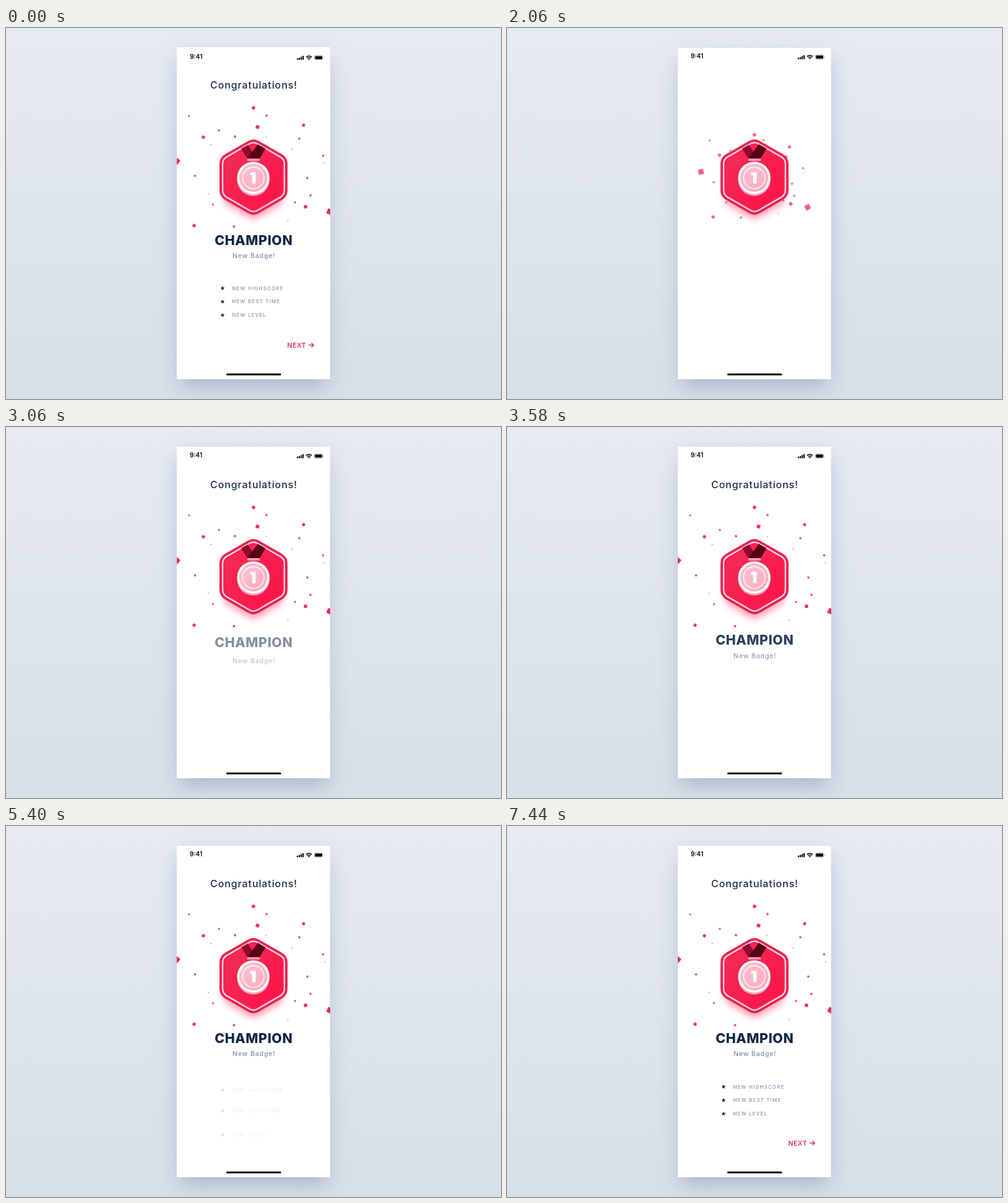
Write an HTML page that moves like this. It is 800x600 px and loops after 8.78 s.

```html
<!DOCTYPE html>
<html lang="en">
<head>
<meta charset="utf-8">
<title>New badge</title>
<style>
html, body { margin: 0; width: 100%; height: 100%; overflow: hidden; }
body { position: relative; background: linear-gradient(#e6ebf3, #dfe5ed 50%, #d7dfe7); }
.shadow {
  position: absolute; left: 276px; top: 32px; width: 247.5px; height: 536px;
  box-shadow: 0 18px 28px -10px rgba(120, 138, 170, .42), 0 8px 36px rgba(165, 180, 205, .32);
}
svg { position: absolute; left: 0; top: 0; width: 800px; height: 600px; display: block; }
text { font-family: Inter, "Open Sans", sans-serif; }
.mid { text-anchor: middle; }
.clock { font-size: 10px; font-weight: 600; }
.head { font-size: 16px; font-weight: 500; letter-spacing: .9px; fill: #182c4c; }
.title { font-size: 21.4px; font-weight: 800; letter-spacing: .6px; fill: #0f2747; }
.sub { font-size: 10.6px; font-weight: 500; letter-spacing: .8px; fill: #8590a4; }
.item text { font-size: 8px; font-weight: 500; letter-spacing: 1.15px; fill: #8a95a8; }
.item use { fill: #14294a; }
.next text { font-size: 10.6px; font-weight: 600; letter-spacing: .5px; fill: #dc335e; }

/* One shared 8.78 s clock */
.first, .scene, .nudge, .head, .rise, .item, .next, .badge { animation: 8780ms linear infinite; }
.first { animation-name: leave; }
.scene { animation-name: fade; }
.nudge { animation-name: nudge; }
.head { animation-name: head; }
.rise { animation-name: rise; }
.item { animation-name: item; }
.next { animation-name: next; }
.badge { animation-name: pop; }
.bit { fill: #ea2c55; animation: fly 8780ms linear infinite, show 8780ms linear infinite; }

@keyframes leave {
  0%, 7.517% { opacity: 1; }
  10.706%, 100% { opacity: 0; }
}
@keyframes fade {
  0%, 7.517% { opacity: 1; }
  10.706% { opacity: 0; }
  10.707%, 100% { opacity: 1; }
}
@keyframes nudge {
  0%, 10.706% { transform: translateY(-.9px); }
  10.707%, 100% { transform: none; }
}
@keyframes pop {
  0%, 10.706% { opacity: 1; transform: none; }
  10.707% { opacity: 0; transform: scale(.3); }
  21.185% { opacity: 0; transform: scale(.3); animation-timing-function: cubic-bezier(.25, 1, .5, 1); }
  23.462% { opacity: 1; transform: translateY(-1px); }
  26%, 100% { opacity: 1; transform: none; }
}
@keyframes fly {
  0%, 10.706% { transform: translate(var(--x), var(--y)) rotate(var(--r)); }
  10.707% { transform: translate(400px, 271px) rotate(calc(var(--r) - 180deg)); }
  21.185% {
    transform: translate(400px, 271px) rotate(calc(var(--r) - 180deg));
    animation-timing-function: cubic-bezier(.22, 1, .36, 1);
  }
  32.005%, 100% { transform: translate(var(--x), var(--y)) rotate(var(--r)); }
}
@keyframes show {
  0%, 10.706% { opacity: 1; }
  10.707%, 21.185% { opacity: 0; }
  24.26%, 100% { opacity: 1; }
}
@keyframes head {
  0%, 10.706% { opacity: 1; transform: none; }
  10.707% { opacity: 0; transform: translateY(8px); }
  25.513% { opacity: 0; transform: translateY(8px); animation-timing-function: cubic-bezier(.25, 1, .5, 1); }
  33.485%, 100% { opacity: 1; transform: none; }
}
@keyframes rise {
  0%, 10.706% { opacity: 1; transform: none; }
  10.707% { opacity: 0; transform: translateY(var(--d)); }
  31.207% { opacity: 0; transform: translateY(var(--d)); animation-timing-function: cubic-bezier(.25, 1, .5, 1); }
  53.986%, 100% { opacity: 1; transform: none; }
}
@keyframes item {
  0%, 10.706% { opacity: 1; transform: none; }
  10.707% { opacity: 0; transform: translateY(var(--d)); }
  60.592% { opacity: 0; transform: translateY(var(--d)); animation-timing-function: cubic-bezier(.25, 1, .5, 1); }
  83.371%, 100% { opacity: 1; transform: none; }
}
@keyframes next {
  0%, 10.706% { opacity: 1; transform: none; }
  10.707% { opacity: 0; transform: translateX(-10px); }
  71.754% { opacity: 0; transform: translateX(-10px); animation-timing-function: cubic-bezier(.25, 1, .5, 1); }
  79.727%, 100% { opacity: 1; transform: none; }
}
</style>
</head>
<body>
<div class="shadow"></div>
<svg viewBox="0 0 800 600">
  <defs>
    <clipPath id="panel"><rect x="276" y="32" width="248" height="536"/></clipPath>
    <linearGradient id="red" x1="0" y1="0" x2="1" y2="1">
      <stop offset="0" stop-color="#f02f58"/>
      <stop offset="1" stop-color="#ff1145"/>
    </linearGradient>
    <linearGradient id="face" x1="0" y1="0" x2="1" y2="1">
      <stop offset="0" stop-color="#fcc3d1"/>
      <stop offset="1" stop-color="#faa9be"/>
    </linearGradient>
    <filter id="blur" x="-50%" y="-50%" width="200%" height="200%"><feGaussianBlur stdDeviation="6"/></filter>
    <path id="hex" stroke-linejoin="round" d="M0-42.7 37-21.35V21.35L0 42.7-37 21.35V-21.35Z"/>
    <path id="star" d="M0-3.6 1-1.2 3.5-1.1 1.5.5 2.2 3 0 1.6-2.2 3-1.5.5-3.5-1.1-1-1.2Z"/>
    <g id="status">
      <text class="clock" x="297" y="48.7">9:41</text>
      <path d="M470 48h2v2.4h-2zM473 47h2v3.4h-2zM476 45.6h2v4.8h-2zM479 44h2v6.4h-2z"/>
      <g fill="none" stroke="#000" stroke-width="1.5">
        <path d="M484.8 46.2a6.6 6.6 0 0 1 9.4 0M486.7 48.1a4 4 0 0 1 5.6 0"/>
      </g>
      <path d="M489.5 50.8 487.9 49.2a2.3 2.3 0 0 1 3.2 0Z"/>
      <rect x="498.3" y="43.6" width="13.6" height="6.9" rx="1.8" fill="none" stroke="#999" stroke-width=".7"/>
      <rect x="499.3" y="44.6" width="11.6" height="4.9" rx="1"/>
      <path d="M512.8 46v2.2q1-.3 1-1.1t-1-1.1Z" fill="#999"/>
    </g>
  </defs>

  <rect x="276" y="32" width="247.5" height="536" fill="#fff"/>
  <use href="#status"/>
  <g class="first">
    <rect x="276" y="31" width="248" height="537" fill="#fff"/>
    <use href="#status" transform="translate(.2 -.4)" y="1.4"/>
  </g>
  <rect x="356" y="558.8" width="88.5" height="3" rx="1.5"/>

  <g class="scene" clip-path="url(#panel)">
    <g class="nudge">
      <text class="head mid" x="400.5" y="98.6">Congratulations!</text>
      <g id="confetti"></g>
      <g transform="translate(400 242)">
        <g class="badge">
          <use href="#hex" transform="translate(0 15) scale(.88)" fill="#ff2e5f" stroke="#ff2e5f" stroke-width="36" opacity=".42" filter="url(#blur)"/>
          <use href="#hex" fill="#ec2650" stroke="#ec2650" stroke-width="36"/>
          <use href="#hex" fill="#ffe4eb" stroke="#ffe4eb" stroke-width="28"/>
          <use href="#hex" fill="#fa2150" stroke="#fa2150" stroke-width="23.6"/>
          <path d="M0-53 46-26.5V26.5L0 53-46 26.5V-26.5Z" fill="url(#red)"/>
          <path d="M-20-46-9-52 5-30H-10Z" fill="#8f0a2e"/>
          <path d="M7-53 19.5-46 10-30H-10Z" fill="#560318"/>
          <rect x="-10" y="-30" width="20" height="4" fill="#f996ac"/>
          <circle cx="-.3" cy="4.6" r="26" fill="#f9a3b8"/>
          <circle cx="-.3" cy="1.4" r="26.2" fill="#fff"/>
          <circle cx="-.3" cy="1.4" r="22.6" fill="url(#face)"/>
          <circle cx="-.3" cy="1.4" r="17.4" fill="none" stroke="#fff" stroke-width="1.3"/>
          <path d="M-2.2-8H3.4V10.4H-2.2V-3.2H-5.6V-6.6Z" fill="#fff"/>
        </g>
      </g>
      <g id="list"></g>
    </g>
    <text class="title mid rise" style="--d:11px" x="400.3" y="351">CHAMPION</text>
    <text class="sub mid rise" style="--d:22px" x="400.7" y="371.6">New Badge!</text>
    <g class="next">
      <text x="454.6" y="516.8">NEXT</text>
      <path d="M488.8 512.8H497M493.6 509.2 497.2 512.8 493.6 516.4" fill="none" stroke="#dc335e" stroke-width="1.5"/>
    </g>
  </g>
</svg>
<script>
const add = (parent, tag, attrs, text = "") => {
  const el = document.createElementNS("http://www.w3.org/2000/svg", tag);
  for (const key in attrs) el.setAttribute(key, attrs[key]);
  el.textContent = text;
  return parent.appendChild(el);
};

// x, y, size, resting angle
const bits = [
  [400, 130, 5, 30], [296, 143, 2.5, 10], [421, 142.5, 3, 15], [406.5, 161, 5.5, 15], [481, 158, 4.5, 28],
  [344, 166.5, 2.8, 10], [370, 176.5, 3.2, 5], [319, 177.5, 4.8, 30], [420.5, 177, 1.3, 0], [474, 180, 3, 12],
  [331.5, 190, 1.4, 0], [462, 197, 1.3, 0], [512.5, 207.5, 3, 15], [515, 219.5, 1.4, 0], [276, 216, 8.5, 40],
  [305.5, 240, 3, 10], [487, 243.5, 3, 18], [492, 271.5, 3, 10], [327, 269, 1.4, 0], [334.5, 286.5, 2.8, 10],
  [467, 283, 2.8, 8], [484, 290, 5.2, 0], [523, 298, 8.5, 25], [304, 320.5, 4.8, 25], [368.5, 322, 3.2, 15],
  [455.5, 312.8, 1.4, 0]
];
const confetti = document.getElementById("confetti");
for (const [x, y, s, r] of bits) {
  add(confetti, "rect", {
    class: "bit", x: -s / 2, y: -s / 2, width: s, height: s,
    style: `--x:${x}px;--y:${y}px;--r:${r}deg`
  });
}

const list = document.getElementById("list");
["NEW HIGHSCORE", "NEW BEST TIME", "NEW LEVEL"].forEach((label, i) => {
  const y = 421.7 + i * 21.8;
  const item = add(list, "g", { class: "item", style: `--d:${[6, 20, 40][i]}px` });
  add(item, "use", { href: "#star", x: 350, y });
  add(item, "text", { x: 365.4, y: y + 2.8 }, label);
});
</script>
</body>
</html>
```
